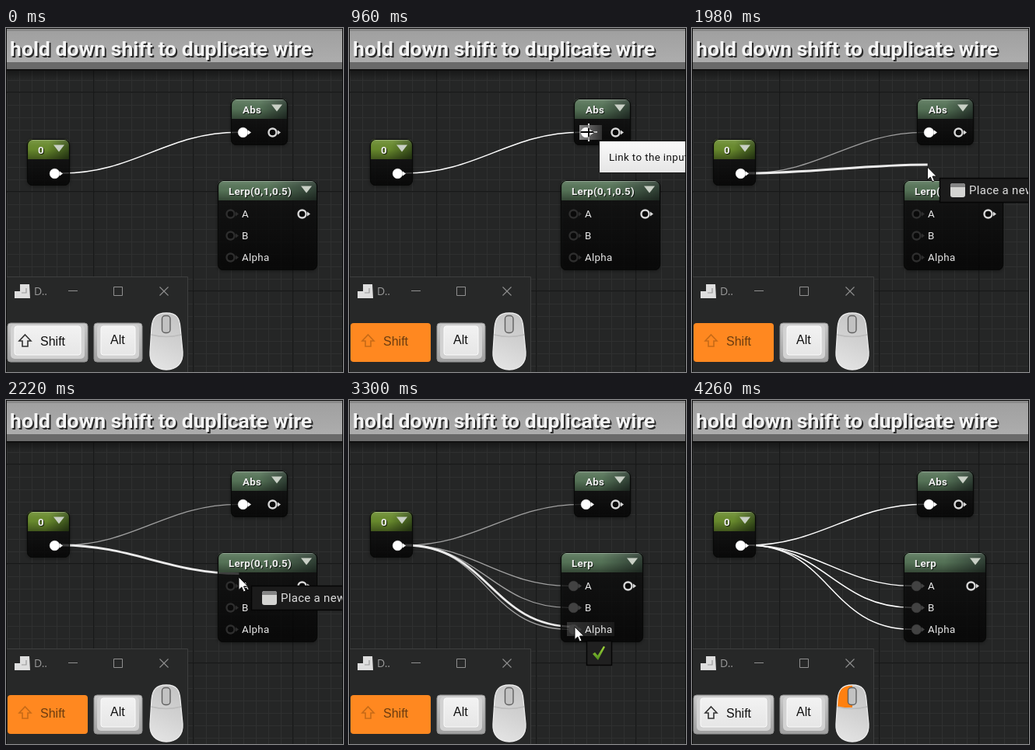
These frames come from a looping animation (433x443 px, 4.32 s). An HTML page with a canvas:

```html
<!DOCTYPE html>
<html lang="en">
<head>
<meta charset="utf-8">
<title>Duplicate wire</title>
<style>
html, body { margin: 0; width: 100%; height: 100%; overflow: hidden; background: #252626; }
canvas { display: block; width: 433px; height: 443px; }
</style>
</head>
<body>
<canvas id="stage" width="433" height="443"></canvas>
<script>
const W = 433, H = 443, LOOP = 4320, STEP = 60;
const c = document.getElementById('stage').getContext('2d');
const UI = 'Roboto, sans-serif';
const KEYS = '16px "Liberation Sans", Arial, sans-serif';

// Cursor path: time, x, y
const PATH = [
  [120, 425, 66], [240, 385, 88], [360, 345, 112], [480, 318, 128], [600, 308, 134],
  [1380, 308, 134], [1440, 307, 137], [1560, 305, 147], [1680, 304, 157], [1920, 303, 170],
  [2040, 302, 188], [2220, 299, 228], [2340, 291, 234], [2520, 291, 234], [2700, 292, 260],
  [2760, 291, 267], [3000, 291, 267], [3120, 290, 286], [3180, 290, 292], [3600, 290, 292],
  [3660, 300, 284], [3780, 362, 200], [3840, 423, 110], [3900, 440, 90]
];
const TIP = [[0, ''], [780, 'link'], [1440, 'place'], [2400, 'check'], [2640, 'place'],
  [2760, 'check'], [3060, 'place'], [3180, 'check'], [3660, '']];
const PRESS = [[0, 0], [1200, 1], [1800, 0], [2520, 1], [2580, 0], [2880, 1], [2940, 0],
  [3240, 1], [3300, 0], [4260, 1]];
const LINKS = [[0, 0], [2580, 1], [2940, 2], [3300, 3]];
const LERP = [['Lerp(0,1,0.5)', 128], ['Lerp(,1,0.5)', 120], ['Lerp(,,0.5)', 112], ['Lerp', 106]];
const ROWS = ['A', 'B', 'Alpha'];
const rowY = i => 239 + 28 * i;

const held = (table, t) => table.filter(s => s[0] <= t).pop()[1];

function cursorAt(t) {
  const i = PATH.findIndex(p => p[0] > t);
  if (i < 1) return PATH[i ? PATH.length - 1 : 0].slice(1);
  const [t0, x0, y0] = PATH[i - 1], [t1, x1, y1] = PATH[i], k = (t - t0) / (t1 - t0);
  return [x0 + (x1 - x0) * k, y0 + (y1 - y0) * k];
}

function rect(x, y, w, h, fill) { c.fillStyle = fill; c.fillRect(x, y, w, h); }

function box(x, y, w, h, r, fill, stroke, lw = 1) {
  c.beginPath();
  c.roundRect(x, y, w, h, r);
  if (fill) { c.fillStyle = fill; c.fill(); }
  if (stroke) { c.strokeStyle = stroke; c.lineWidth = lw; c.stroke(); }
}

function poly(pts, fill, stroke, lw = 1, close = true) {
  c.beginPath();
  pts.forEach(p => c.lineTo(...p));
  if (close) c.closePath();
  if (fill) { c.fillStyle = fill; c.fill(); }
  if (stroke) { c.strokeStyle = stroke; c.lineWidth = lw; c.stroke(); }
}

function text(s, x, y, fill, font, gap = 0) {
  c.font = font;
  c.letterSpacing = gap + 'px';
  c.fillStyle = fill;
  c.fillText(s, x, y);
}

function grad(x0, y0, x1, y1, ...cols) {
  const g = c.createLinearGradient(x0, y0, x1, y1);
  cols.forEach((col, i) => g.addColorStop(i / (cols.length - 1), col));
  return g;
}

function backdrop() {
  rect(0, 0, W, H, '#252626');
  for (let x = 1; x < W; x += 16) rect(x, 0, 1, H, '#2f3030');
  for (let y = 3; y < H; y += 16) rect(0, y, W, 1, '#2f3030');
  for (let x = 113; x < W; x += 128) rect(x - 1, 0, 1.5, H, '#181919');
  for (let y = 83; y < H; y += 128) rect(0, y - 1, W, 1.5, '#181919');
  rect(0, 54, W, 12, grad(0, 54, 0, 66, 'rgba(0,0,0,.4)', 'rgba(0,0,0,0)'));
}

function banner() {
  rect(0, 0, W, 55, '#101010');
  rect(0, 1, W, 52, '#8a8a8a');
  rect(0, 4, W, 40, grad(0, 4, 0, 44, '#a0a0a0', '#adadad'));
  rect(0, 44, W, 9, '#6a6a6a');
  const s = 'hold down shift to duplicate wire', f = 'bold 26.6px ' + UI;
  text(s, 7, 38, '#2a2a2a', f);
  text(s, 5, 36, '#f4f4f4', f);
}

function wire(x, y, color, width) {
  const x0 = 72, y0 = 187, d = (Math.abs(x - x0) + Math.abs(y - y0)) / 3;
  c.beginPath();
  c.moveTo(x0, y0);
  c.bezierCurveTo(x0 + d, y0, x - d, y, x, y);
  c.strokeStyle = color;
  c.lineWidth = width;
  c.stroke();
}

function pin(px, py, color, full) {
  const x = px + .5, y = py + .5;
  c.beginPath();
  c.arc(x, y, full ? 6.3 : 5, 0, 7);
  c.fillStyle = full ? color : '#0a0a0a';
  c.fill();
  c.strokeStyle = color;
  c.lineWidth = full ? 0.5 : 2.4;
  c.stroke();
  poly([[x + 6.5, y - 3], [x + 10.5, y], [x + 6.5, y + 3]], color);
}

function node(x, y, w, h, title, tx, light, dark) {
  c.save();
  c.shadowColor = 'rgba(0,0,0,.7)';
  c.shadowBlur = 5;
  c.shadowOffsetY = 1;
  box(x, y, w, h, 7, 'rgba(0,0,0,.5)');
  c.restore();
  c.save();
  c.beginPath();
  c.roundRect(x, y, w, h, 7);
  c.clip();
  rect(x, y + 26, w, h - 26, grad(0, y + 26, 0, y + h, 'rgba(30,31,31,.3)', 'rgba(0,0,0,.3)'));
  c.globalAlpha = 0.88;
  rect(x, y, w, 26, grad(x, y, x + w, y + 14, light, light, dark));
  c.globalAlpha = 1;
  rect(x, y, w, 26, grad(0, y, 0, y + 26, 'rgba(255,255,255,.14)', 'rgba(0,0,0,.05)', 'rgba(0,0,0,.4)'));
  rect(x, y + 1, w, 1, 'rgba(255,255,255,.25)');
  c.restore();
  box(x + .5, y + .5, w - 1, h - 1, 7, null, '#080908', 1.2);
  const f = 'bold 13.33px ' + UI;
  text(title, tx + 1, y + 20, 'rgba(0,0,0,.7)', f, .3);
  text(title, tx, y + 19, '#f0f0f0', f, .3);
  poly([[x + w - 21, y + 7.5], [x + w - 7, y + 7.5], [x + w - 14, y + 16.5]], '#c9d0c6');
}

function nodes(t, n, hover) {
  node(27, 143, 55, 60, '0', 41, '#7aa234', '#3f5a1e');
  pin(62, 187, '#fff', true);

  node(289, 91, 73, 60, 'Abs', 304, '#648766', '#34463a');
  if (t >= 600 && t < 1440)
    rect(296, 125, 29, 19, grad(296, 0, 325, 0, 'rgba(255,255,255,.5)', 'rgba(255,255,255,.15)'));
  pin(304, 134, '#fff', true);
  pin(342, 134, '#d8d8d8', false);

  const [title, w] = LERP[n];
  node(272, 196, w, 116, title, 286, '#648766', '#34463a');
  pin(272 + w - 20, 239, '#d8d8d8', false);
  ROWS.forEach((s, i) => {
    const y = rowY(i);
    if (i === hover) {
      const hw = 26 + s.length * 7;
      rect(280, y - 9, hw, 18, grad(280, 0, 280 + hw, 0, 'rgba(255,255,255,.16)', 'rgba(255,255,255,.06)'));
    }
    pin(288, y, i < n ? '#424242' : '#2e2e2e', i < n);
    text(s, 303, y + 5, '#e6e6e6', '13.33px ' + UI, .3);
  });
}

function tooltip(kind, x, y) {
  if (kind === 'link') {
    box(321.5, 145.5, 130, 41, 0, grad(0, 145, 0, 186, '#fafafa', '#e6e6e6'), '#1a1a1a');
    text('Link to the input', 334, 171, '#111', '13.33px ' + UI, .4);
  } else if (kind === 'place') {
    box(x + .5, y + .5, 150, 31, 0, '#1b1b1b', '#050505', 1.5);
    box(x + 14, y + 7, 19, 18, 3, '#d4d4d2');
    box(x + 14, y + 7, 19, 5, [3, 3, 0, 0], '#858585');
    text('Place a new node', x + 38, y + 21, '#dcdcdc', '15px ' + UI, .3);
  } else if (kind === 'check') {
    box(x + .5, y + .5, 32, 31, 0, '#202020', '#050505', 1.5);
    poly([[x + 8, y + 17], [x + 11, y + 15], [x + 14.5, y + 19], [x + 22, y + 7], [x + 24, y + 8],
      [x + 15, y + 25]], grad(0, y + 7, 0, y + 25, '#a5dc3c', '#4c8a1c'));
  }
}

function pointer(t, x, y) {
  if (t < 120 || t >= 3900) return;
  if (t >= 720 && t < 1440) {
    c.save();
    c.globalCompositeOperation = 'difference';
    rect(307, 123, 2, 23, '#fff');
    rect(297, 133, 10, 2, '#fff');
    rect(309, 133, 10, 2, '#fff');
    c.restore();
    return;
  }
  const shape = [[0, 0], [0, 16.5], [3.8, 13], [6.4, 19], [9, 17.8], [6.5, 12], [11.8, 12]];
  poly(shape.map(p => [x + p[0], y + p[1]]), '#fff', '#111', 1);
}

function key(x, w) {
  box(x, 380, w, 50, 4, grad(0, 380, 0, 430, '#c9c9c9', '#a0a0a0'), '#909090');
  box(x + 4, 382, w - 8, 44, 5, '#d2d2d2');
  box(x + 9, 384, w - 18, 37, 3, grad(0, 384, 0, 421, '#f2f2f2', '#e6e6e6'), '#fbfbfb');
}

function shiftKey(down) {
  if (down) box(2, 380, 103, 50, 4, '#ff8820');
  else key(2, 103);
  text('Shift', 44, 409, down ? '#6b3c10' : '#111', KEYS);
  poly([[24.5, 395], [32, 403], [28, 403], [28, 410], [21, 410], [21, 403], [17, 403]],
    null, down ? '#c66a17' : '#333', 1.6);
}

function mouse(down) {
  const body = new Path2D('M206 367C219 367 223 373 224 386L227 417C228 432 219 440 206 440'
    + 'C193 440 184 432 185 417L187 386C188 373 193 367 206 367Z');
  c.fillStyle = grad(222, 370, 190, 438, '#c4c4c4', '#d2d2d2', '#e4e4e4');
  c.fill(body);
  if (down) {
    c.save();
    c.clip(body);
    rect(184, 367, 22, 29, '#ff8010');
    c.restore();
  }
  c.strokeStyle = '#ececec';
  c.lineWidth = 1.3;
  c.stroke(body);
  c.beginPath();
  c.moveTo(186.5, 395);
  c.quadraticCurveTo(206, 400, 225, 395);
  c.strokeStyle = '#bcbcbc';
  c.stroke();
  box(200.5, 370.5, 10.5, 22, 4, '#c2c2c2', '#606060', 1.4);
}

function keyWindow(shift, pressed) {
  rect(0, 320, 234, 123, '#272828');
  box(-1, 320.5, 234.5, 130, 0, null, '#3e3f3f');
  poly([[18, 330], [30, 330], [31, 348], [11, 348], [11, 339], [18, 339]], '#dedede');
  poly([[26, 335], [26, 341], [20, 341]], null, '#999', 1.2, false);
  text('D..', 36, 344, '#989898', '14px "Open Sans", sans-serif');
  rect(80, 338, 12, 1, '#909090');
  box(138.5, 333.5, 11, 11, 0, null, '#909090');
  poly([[197.5, 333.5], [208.5, 344.5]], null, '#909090', 1.1, false);
  poly([[208.5, 333.5], [197.5, 344.5]], null, '#909090', 1.1, false);
  shiftKey(shift);
  key(113, 62);
  text('Alt', 134, 407, '#111', KEYS);
  mouse(pressed);
}

function draw(t) {
  const n = held(LINKS, t), shift = t >= 720 && t < 3480;
  const drag = t >= 1440 && t < 3480, dim = t >= 1260 && t < 3480;
  // The wire end and the tooltip trail the cursor slightly
  const [x, y] = cursorAt(t), [wx, wy] = cursorAt(t - 20), [tx, ty] = cursorAt(t - 30);
  const over = t >= 1440 && t < 3660 ? ROWS.findIndex((s, i) => Math.abs(y - rowY(i)) <= 10) : -1;
  const color = dim ? '#a0a0a0' : '#fff', width = dim ? 1.3 : 1.5;

  backdrop();
  wire(299, 134.3, color, width);
  for (let i = 0; i < n; i++) wire(282, rowY(i) + .3, color, width);
  if (drag) wire(wx, wy, '#ececec', 2.8);
  nodes(t, n, over);
  banner();
  keyWindow(shift, held(PRESS, t));
  tooltip(held(TIP, t), Math.round(tx + 15), Math.round(ty + 18));
  pointer(t, x, y);
  rect(0, 0, 1, H, '#0c0c0c');
  rect(432, 0, 1, H, '#0c0c0c');
}

const start = performance.now();
function tick() {
  const t = (performance.now() - start) % LOOP;
  draw(Math.floor(t / STEP) * STEP);
  requestAnimationFrame(tick);
}
tick();
</script>
</body>
</html>
```
